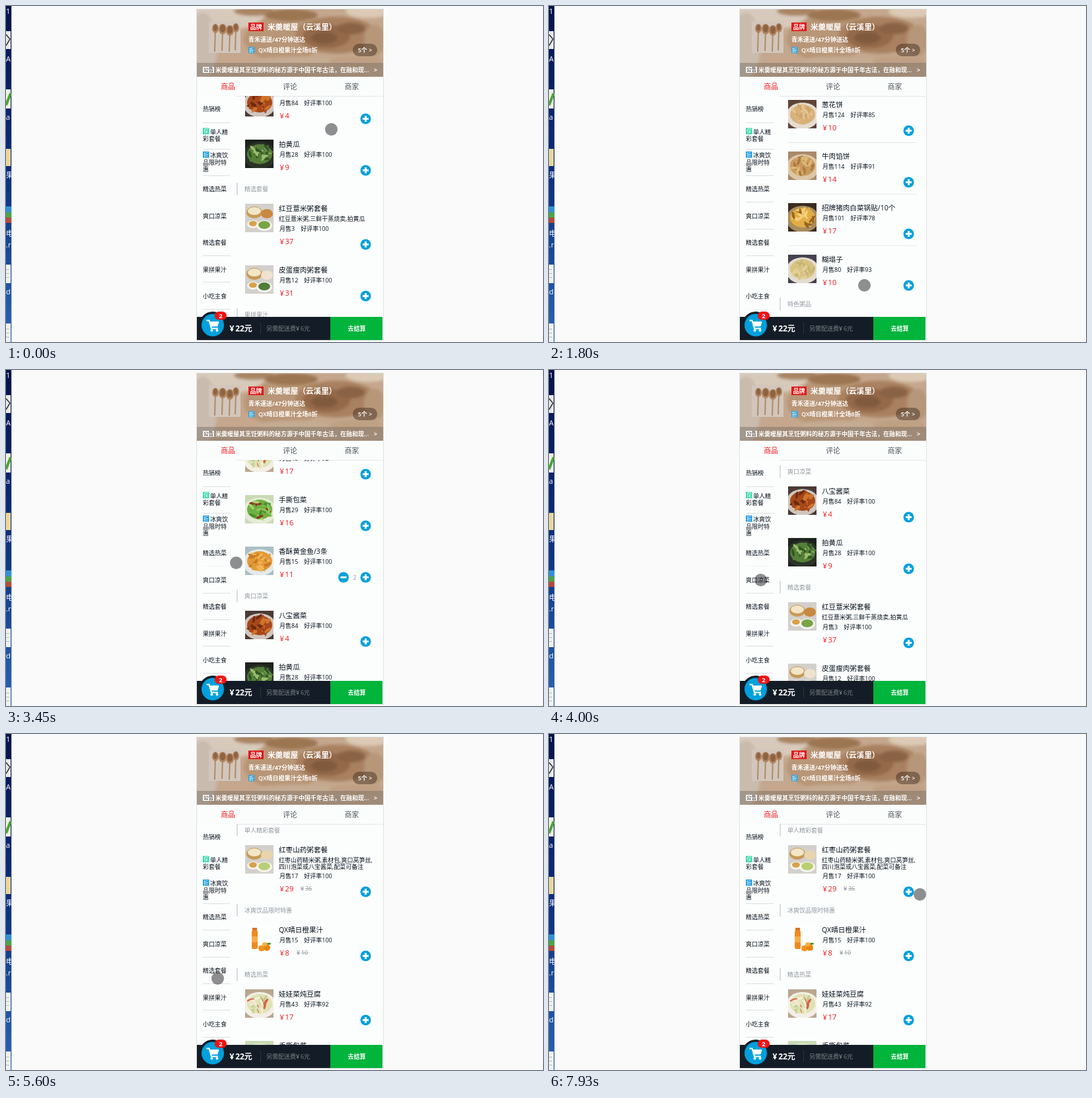
Write an HTML page that moves like this. It is 813 by 508 pixels and loops after 8000 ms.

```html
<!DOCTYPE html>
<html lang="zh-CN">
<head>
<meta charset="utf-8">
<title>点餐</title>
<style>
html, body { margin: 0; width: 100%; height: 100%; overflow: hidden; background: #fafafa; }
svg { display: block; }
text { font-family: "Open Sans", "Noto Sans CJK SC", "Noto Sans CJK", sans-serif; white-space: pre; }
</style>
</head>
<body>
<svg id="stage" width="813" height="508" viewBox="0 0 813 508"></svg>
<script>
const LOOP = 8000, TOP = 136, FOOT = 470, DARK = '#07111b', GREY = '#93999f', RED = '#f01414', BLUE = '#00a0dc';

// y is the vertical centre of the line
const text = (x, y, s, size, fill, more = '') =>
  `<text x="${x}" y="${y + size * .37}" font-size="${size}" fill="${fill}" ${more}>${s}</text>`;
const rect = (x, y, w, h, fill, more = '') =>
  `<rect x="${x}" y="${y}" width="${w}" height="${h}" fill="${fill}" ${more}/>`;
const oval = (x, y, rx, ry, fill, more = '') =>
  `<ellipse cx="${x}" cy="${y}" rx="${rx}" ry="${ry}" fill="${fill}" ${more}/>`;
const path = (d, stroke, w, fill = 'none') =>
  `<path d="${d}" stroke="${stroke}" stroke-width="${w}" fill="${fill}"/>`;
const yuan = n => `¥<tspan dx="1.8">${n}</tspan>`;
const BOLD = 'font-weight="700" ', SEMI = 'font-weight="600" ', MID = 'text-anchor="middle"';

let seed = 7;
const rnd = () => (seed = seed * 16807 % 2147483647) / 2147483647;

// Dish pictures, 43 by 43
function dish(bg, plate, ...foods) {
  let s = rect(0, 0, 43, 43, bg) + oval(22, 24, 25, 20, plate) + oval(22, 22, 19, 15, foods[0]);
  for (let i = 0; i < 26; i++) {
    const a = rnd() * 6.28, r = Math.sqrt(rnd()), x = 22 + 16 * r * Math.cos(a), y = 22 + 13 * r * Math.sin(a);
    s += oval(x, y, 6, 2, foods[i % foods.length], `transform="rotate(${rnd() * 180 | 0} ${x} ${y})"`);
  }
  return s;
}
const baskets = (a, b) => rect(0, 0, 43, 43, '#d3d0cb') +
  oval(14, 13, 12, 9, '#c79a55') + oval(14, 11, 10, 6, '#f2e6c8') + oval(33, 15, 9, 7, a) +
  oval(12, 31, 9, 6, '#f4f2ec') + oval(12, 30, 6, 4, '#d8a04a') + oval(29, 33, 12, 8, '#f4f4ee') + oval(29, 32, 9, 6, b);
const bottle = () => rect(0, 0, 43, 43, '#fdfefe') + rect(11, 4, 7, 4, '#d8742a') + rect(10, 8, 9, 28, '#ee8a1f', 'rx="2"') +
  rect(10, 17, 9, 9, '#f6ab4c') + oval(25, 35, 5, 4.5, '#f0951f') + oval(33, 34, 5, 5, '#e98312') +
  oval(30, 29, 4, 3, '#f7b23a') + oval(36, 28, 3, 1.5, '#4f8a35');
const can = () => rect(0, 0, 43, 43, '#c5bdba') + rect(9, 4, 25, 36, '#bd2329', 'rx="4"') + oval(21.5, 5, 11, 2, '#d9d4d2') +
  rect(12, 9, 4, 27, '#d8484a') + oval(22, 22, 5, 8, '#d3a04e');
const cup = () => rect(0, 0, 43, 43, '#e5e2df') + path('M10 13H34L29 41H15Z', '#f5efe8', 1, '#ecc99f') +
  oval(22, 14, 12, 5, '#f3e0c4') + oval(18, 24, 4, 3, '#e6ae7c') + oval(26, 28, 4, 3, '#f2d9b5') + oval(22, 9, 5, 5, '#cc3526');

const juice = ['QX晴日橙果汁', 15, 100, 8, bottle, { old: 10 }];
const sections = [
  ['单人精彩套餐', [['红枣山药粥套餐', 17, 100, 29, () => baskets('#e8d5ae', '#b9cf74'),
    { old: 36, desc: ['红枣山药糙米粥,素材包,爽口莴笋丝,', '四川泡菜或八宝酱菜,配菜可备注'] }]]],
  ['冰爽饮品限时特惠', [juice]],
  ['精选热菜', [
    ['娃娃菜炖豆腐', 43, 92, 17, () => dish('#b9a78f', '#f3efe6', '#dfe2b4', '#f3efd5', '#c3cf8e', '#efe8cf', '#d4664a')],
    ['手撕包菜', 29, 100, 16, () => dish('#c9dab5', '#e4ecd6', '#6fb043', '#a5d56e', '#498d2c', '#8fc75a', '#8c3a25')],
    ['香酥黄金鱼/3条', 15, 100, 11, () => dish('#a9bfc4', '#e4eaea', '#e39a37', '#f0b458', '#c97a22'), { count: 2 }]]],
  ['爽口凉菜', [
    ['八宝酱菜', 84, 100, 4, () => dish('#4b3a35', '#cfc6bf', '#a8481a', '#d0762c', '#6d2a12')],
    ['拍黄瓜', 28, 100, 9, () => dish('#1d231d', '#2b3328', '#557f38', '#9cbc6c', '#2f5724')]]],
  ['精选套餐', [
    ['红豆薏米粥套餐', 3, 100, 37, () => baskets('#c98840', '#79a445'), { desc: ['红豆薏米粥,三鲜干蒸烧卖,拍黄瓜'] }],
    ['皮蛋瘦肉粥套餐', 12, 100, 31, () => baskets('#efe3cf', '#4f7c36')]]],
  ['果拼果汁', [
    ['蜜瓜圣女萝莉杯', 1, '', 6, cup],
    ['乐禾泉', 7, 100, 6, can],
    juice]],
  ['小吃主食', [
    ['扁豆焖面', 188, 96, 14, () => dish('#b4a89b', '#f2f0ec', '#8d5c25', '#b98540', '#57401c', '#5f7d32')],
    ['葱花饼', 124, 85, 10, () => dish('#5d4538', '#e5ddd3', '#d9b27a', '#e4c592', '#cfa46c')],
    ['牛肉馅饼', 114, 91, 14, () => dish('#a98a6b', '#dcc6a6', '#c99a5c', '#dcb878', '#a97845')],
    ['招牌猪肉白菜锅贴/10个', 101, 78, 17, () => dish('#3b2c22', '#a88d5e', '#e2ad44', '#f1cf78', '#9a6422')],
    ['糊塌子', 80, 93, 10, () => dish('#45424f', '#e2ddd0', '#d9c283', '#e2d096', '#c4b673')]]],
  ['特色粥品', []]
];

const disc = (x, y, plus) => oval(x, y, 8, 8, BLUE) +
  path(`M${x - 4.5} ${y}h9` + (plus ? `M${x} ${y - 4.5}v9` : ''), '#fff', 3);

function product([name, sold, rate, price, picture, { old, desc = [], count } = {}], y) {
  const extra = [0, 15, 24][desc.length], sellY = y + 22.5 + extra, priceY = y + 41.5 + extra, plusY = y + 46.5 + extra;
  let s = `<svg x="362" y="${y}" width="43" height="43">${picture()}</svg>` +
    text(413, y + 7, name, 10.6, DARK) +
    desc.map((d, i) => text(413, y + 23 + i * 9.5, d, 9, DARK)).join('') +
    text(414, sellY, `月售${sold}<tspan dx="9">好评率${rate}</tspan>`, 9, DARK) +
    text(414.5, priceY, yuan(price), 11, RED);
  if (old) s += text(434 + 6 * String(price).length, priceY + .5, yuan(old), 9, GREY, 'text-decoration="line-through"');
  if (count) s += disc(511, plusY) + text(528, plusY, count, 9, GREY, MID);
  return s + disc(544.5, plusY, true);
}

const starts = [];
function goods() {
  let y = 0, s = '', rules = '';
  for (const [title, items] of sections) {
    starts.push(y);
    s += rect(349, y, 2, 19, '#d9dde1') + text(361, y + 10, title, 9, GREY);
    y += 19;
    items.forEach((item, i) => {
      s += product(item, y + 13);
      y += 78 + [0, 15, 24][(item[5]?.desc || []).length];
      if (i < items.length - 1) rules += rect(362, y - 1, 195, 1, '#e6e8e9');
    });
  }
  return s + `<g id="rules">${rules}</g>`;
}

const tag = (x, y, s, fill) => rect(x, y, 9.5, 9.5, fill) + text(x + 4.8, y + 4.8, s, 7.5, '#fff', MID);

function menu() {
  const row = (y, s, x = 298) => text(x, y, s, 9, DARK);
  let s = row(156, '热销榜') +
    tag(298, 184.5, '保', '#2fd6a8') + row(191, '单人精', 309) + row(201, '彩套餐') +
    tag(298, 220, '折', '#1c9be0') + row(226, '冰爽饮', 309) + row(237, '品限时特') + row(247, '惠');
  ['精选热菜', '爽口凉菜', '精选套餐', '果拼果汁', '小吃主食'].forEach((n, i) => s += row(277 + i * 40.4, n));
  for (let i = 0; i < 8; i++) s += rect(298, Math.round(175.5 + i * 40.3), 42, 1, '#dcdfe1', 'class="sep"');
  return s;
}

function desktop() {
  let s = rect(0, 0, 8, 508, 'url(#sky)');
  [['1', 8], ['A', 80], ['a', 168], ['果', 256], ['电', 344], ['.r', 361], ['d', 432]]
    .forEach(([c, y]) => s += text(0, y, c, 11, '#fff'));
  s += rect(0, 38, 7, 27, '#e8e8e8') + path('M0 43L6 50L0 60', '#333', 1.5) +
    rect(0, 126, 7, 29, '#f0f0e4') + path('M0 150L7 132', '#4aa52e', 4) +
    rect(0, 216, 7, 26, '#e9d69a') + rect(0, 303, 8, 9, '#2f92d8') + rect(0, 312, 8, 8, '#49a545') + rect(0, 320, 8, 8, '#b8493b') +
    rect(0, 391, 7, 28, '#f1f1f1') + rect(0, 480, 7, 28, '#f1f1f1');
  for (const y of [398, 404, 410, 488, 494, 500]) s += rect(0, y, 5, 1, '#b9bcc0');
  return `<g clip-path="url(#strip)">${s}</g>` + rect(8, 0, 1, 508, '#c9cbcd');
}

function header() {
  const blots = [[330, 14, 60, 22, '#d8cabb'], [298, 60, 22, 50, '#c9bbad'], [375, 8, 30, 7, '#a98564'],
    [420, 50, 60, 34, '#b89677'], [432, 14, 40, 9, '#9c7451'], [548, 8, 34, 10, '#dccab5'],
    [500, 44, 62, 28, '#a98160'], [485, 46, 36, 18, '#94694a'], [482, 48, 20, 9, '#805a3e'],
    [522, 34, 22, 9, '#8a6245'], [558, 52, 16, 24, '#b7977a'], [440, 84, 60, 8, '#c4ab92'], [530, 84, 40, 8, '#bea083']];
  const spoons = [[317, 34, 5, 69], [328, 35, 6, 68], [339, 37, 6, 69], [348, 33, 5, 67]];
  return `<g clip-path="url(#head)">` + rect(289, 5, 282, 102, '#c4a78d') +
    `<g filter="url(#soft)">${blots.map(b => oval(...b)).join('')}</g>` + rect(289, 86, 282, 21, 'rgba(110,100,92,.42)') + '</g>' +
    rect(307, 23, 48, 48, '#d2c6bc') +
    spoons.map(([x, y, r, end]) => path(`M${x} ${y}L${x - 1} ${end}`, '#b08a66', 2) +
      oval(x, y, r, r + 2, '#b3865f') + oval(x, y - 1, r - 2, r, '#8d6443')).join('') +
    rect(367, 25, 23, 13, '#e01a1a') + text(378.5, 31.5, '品牌', 9, '#fff', BOLD + MID) +
    text(396, 31.5, '米羹暖屋（云溪里）', 11.6, '#fff', BOLD) +
    text(367, 51, '青禾速送/47分钟送达', 9, '#fff', BOLD) +
    tag(367, 62, '折', '#3aa3d8') + text(382, 67, 'QX晴日橙果汁全场8折', 9, '#fff', SEMI) +
    rect(525, 57, 37, 19, 'rgba(60,40,25,.45)', 'rx="9.5"') + text(543.5, 67, '5个 >', 9, '#fff', SEMI + MID) +
    rect(298, 92, 17, 9, '#fff') + text(306.5, 96.5, '公告', 7.5, '#5d5149', BOLD + MID) +
    text(317, 97, '米羹暖屋其烹饪粥料的秘方源于中国千年古法，在融和现...', 9, '#fff', SEMI) +
    text(557, 97, '>', 9, '#fff', BOLD);
}

const tabs = () => rect(289, 107, 282, 29, '#fbfdfd') +
  [['商品', 336, RED], ['评论', 430, '#4d555d'], ['商家', 523.5, '#4d555d']]
    .map(([s, x, c]) => text(x, 122, s, 10.8, c, MID)).join('') + rect(349, 136, 222, 1, '#e4e6e8');

const footer = () => rect(289, FOOT, 202, 505 - FOOT, '#141d27') + rect(491, FOOT, 79, 505 - FOOT, '#00b43c') +
  oval(313, 482.5, 20.5, 20.5, '#141d27') + oval(313, 482.5, 17, 17, BLUE) +
  path('M303.5 475.5h4l3.5 12h10', '#fff', 2) + path('M308 477.5h14l-2 6.5h-10z', '#fff', 1, '#fff') +
  oval(311.5, 490.5, 2, 2, '#fff') + oval(319.5, 490.5, 2, 2, '#fff') +
  rect(316, 462, 18, 12.5, RED, 'rx="6.2"') + text(325, 468.3, 2, 9.5, '#fff', BOLD + MID) +
  text(338.5, 488, yuan('22元'), 12, '#fff', BOLD) + rect(385, 479, 1, 17, '#2b343c') +
  text(394, 488, `另需配送费${yuan('6元')}`, 9, '#7b8085') + text(531, 488, '去结算', 9, '#fff', BOLD + MID);

const stage = document.getElementById('stage');
stage.innerHTML = `<defs>
  <linearGradient id="sky" x2="0" y2="1"><stop stop-color="#06134a"/><stop offset=".5" stop-color="#0b2f80"/><stop offset="1" stop-color="#2a65b8"/></linearGradient>
  <clipPath id="strip">${rect(0, 0, 8, 508, '#000')}</clipPath>
  <clipPath id="head">${rect(289, 5, 282, 102, '#000')}</clipPath>
  <clipPath id="view">${rect(289, TOP, 282, FOOT - TOP, '#000')}</clipPath>
  <filter id="soft"><feGaussianBlur stdDeviation="2"/></filter></defs>` +
  desktop() + rect(288.5, 4.5, 283, 501, '#fcfefe', 'stroke="#e0e2e3"') + header() + tabs() + menu() +
  `<g clip-path="url(#view)"><g id="list">${goods()}</g></g>` + footer() +
  oval(.5, .5, 9.5, 9.5, 'rgba(40,38,42,.52)', 'id="dot"');

// The screen refreshes in short steps: [first, last, count]
const ticks = [0].concat(...[[150, 1080, 8], [1230, 2220, 8], [2370, 3300, 8], [3450, 4390, 8], [4510, 5450, 8],
  [5600, 5870, 3], [6150, 7120, 8], [7270, 7930, 6]]
  .map(([a, b, n]) => Array.from({ length: n }, (_, i) => a + (b - a) * i / (n - 1))));

const scroll = [[0, 515], [150, 530], [450, 640], [814, 868], [1080, 1092], [1500, 1193], [1940, 1193], [2220, 1105],
  [3300, 300], [3450, 275], [3700, 275], [4000, 471], [4350, 471], [4600, 121], [4850, 121], [5150, 0],
  [6150, 0], [6500, 646], [7250, 646], [7600, 0]];
const pointer = [[0, 492, 186], [450, 495, 390], [814, 495, 233], [1000, 493, 165], [1230, 485, 350], [1500, 480, 260],
  [1796, 477, 422], [2200, 477, 200], [2500, 478, 430], [2750, 478, 210], [3050, 470, 420], [3450, 348, 291],
  [3700, 320, 317], [4100, 320, 317], [4350, 320, 226], [4700, 320, 226], [4850, 320, 195], [5200, 320, 195],
  [5600, 320, 369], [5735, 327, 350], [5870, 325, 342], [6150, 325, 342], [6250, 320, 357], [6900, 320, 357],
  [7120, 320, 195], [7400, 320, 195], [7790, 588, 320], [7930, 561, 242]];

function at(keys, t, k = 1) {
  const i = keys.findIndex(p => p[0] > t);
  if (i < 0) return keys.at(-1)[k];
  const a = keys[i - 1], b = keys[i];
  return a[k] + (b[k] - a[k]) * (t - a[0]) / (b[0] - a[0]);
}

const list = document.getElementById('list'), dot = document.getElementById('dot'),
  rules = document.getElementById('rules'), seps = document.querySelectorAll('.sep');

function draw(now) {
  const t = ticks.findLast(a => a <= now % LOOP + 15);
  const y = Math.round(at(scroll, t));
  list.setAttribute('transform', `translate(0 ${TOP - y})`);
  dot.setAttribute('transform', `translate(${at(pointer, t)} ${at(pointer, t, 2)})`);
  // Hairlines drop out while the list is moving
  rules.setAttribute('opacity', t > 1450 && t < 2000 || t > 4600 && t < 5500 ? 1 : 0);
  const current = starts.findLastIndex(s => s <= y) + 1;
  seps.forEach((s, i) => s.setAttribute('opacity', i === current - 1 ? 0 : i === current ? .25 : 1));
  requestAnimationFrame(draw);
}
requestAnimationFrame(draw);
</script>
</body>
</html>
```
